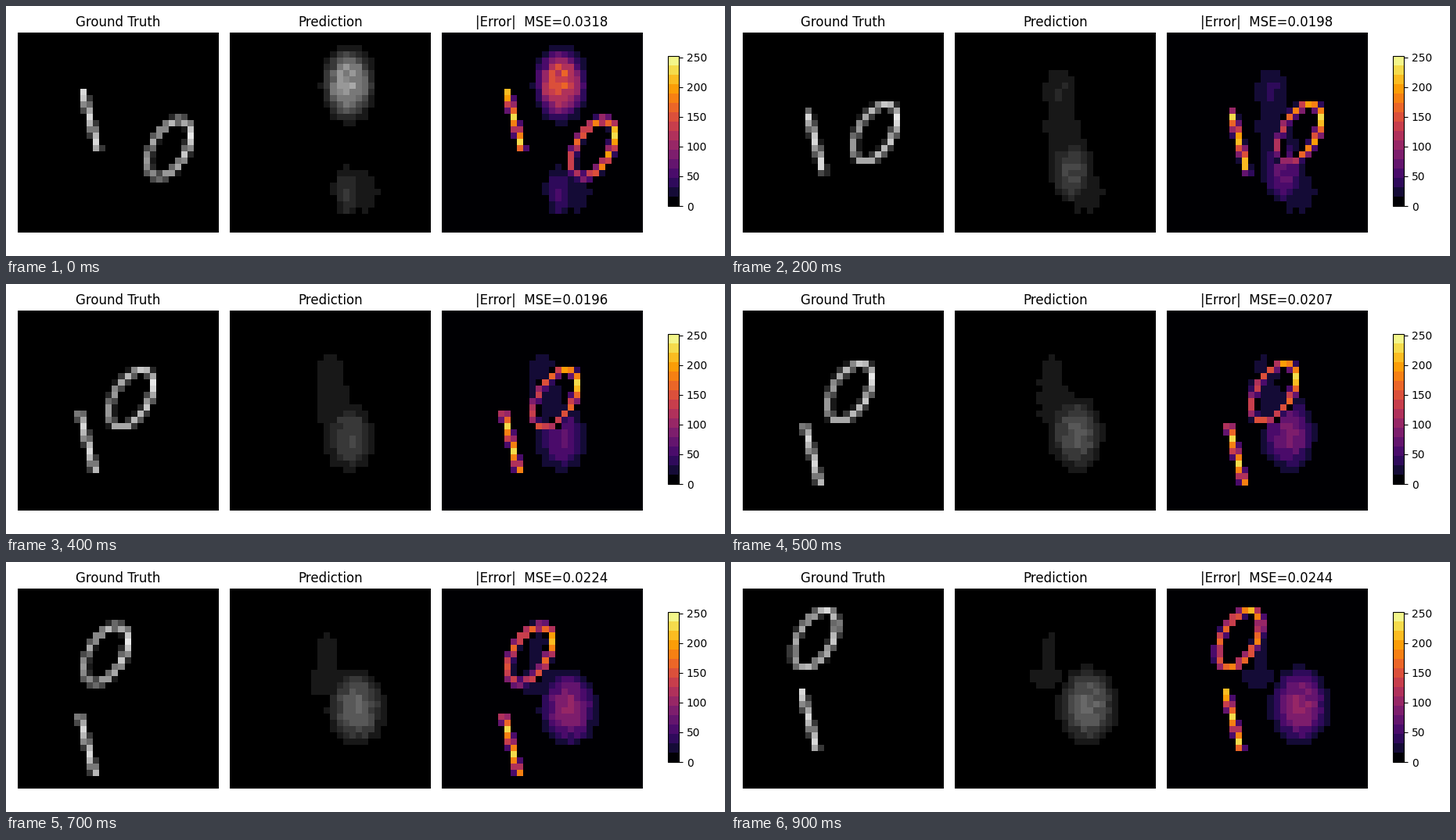
These frames come from a looping animation (919x320 px, 1000 ms). A matplotlib script:

```python
import numpy as np
import matplotlib.pyplot as plt
from matplotlib.animation import FuncAnimation
from matplotlib.colors import ListedColormap

W, H, DPI = 919, 320, 100
N, SUB, FRAMES = 32, 6, 10

# Key points over time
KEYS = [0, 1, 2, 3, 5, 7, 9]
MSE = [.0318, .0218, .0198, .0185, .0207, .0224, .0244]
BODY_PEAK = [48, 125, 65, 42, 80, 92, 95]

cells = np.arange(N) + .5
CX, CY = np.meshgrid(cells, cells)
fine = (np.arange(N * SUB) + .5) / SUB
FX, FY = np.meshgrid(fine, fine)
grain = np.random.default_rng(4).uniform(.84, 1.16, (N, N))


def stroke(xs, ys, radius=.49):
    """Coverage of each cell by a round pen following the points."""
    dist = np.full(FX.shape, 99.0)
    for x, y in zip(xs, ys):
        np.minimum(dist, (FX - x) ** 2 + (FY - y) ** 2, out=dist)
    inside = dist < radius ** 2
    return inside.reshape(N, SUB, N, SUB).mean(axis=(1, 3))


def ground_truth(t):
    # Both digits move on a half-cell raster
    x = np.floor(56.05 - 2.78 * t) / 2 - 3.95
    y = np.floor(27.55 - 2.3 * t) / 2 + 5.05
    a = np.linspace(0, 2 * np.pi, 140)
    zero = stroke(x + 3.45 * np.sin(a + .52), y - 4.55 * np.cos(a))
    zero *= 200 + 7 * (CX - x)  # heavier on the right

    # The one falls, then bounces off the lower edge
    top = np.floor(min(18.3 + 3.6 * t, 65.3 - 3.6 * t)) / 2
    left = 10.4 - (t + 1) // 5 / 2
    s = np.linspace(0, 1, 60)
    one = 235 * stroke(left + 2.4 * s, top + .4 + 9.2 * s)
    return np.clip(np.maximum(zero, one), 0, 255)


def blob(x, y, w, h, peak):
    r = np.hypot((CX - x) / w, (CY - y) / h)
    return peak * np.exp(-r ** 3)


def ease(start, end, t, span):
    """Exponential approach from start to end."""
    return end + (start - end) * np.exp(-t / span)


def prediction(t):
    head = blob(ease(18.9, 15, t, 2.5), ease(8.2, 11.5, t, 3), 3.4 - .2 * t, 4.9,
                ease(150, 27, t, .55))
    body = blob(18.5 + .033 * t ** 2, ease(25.5, 18.2, t, 3.2),
                ease(2, 4.1, t, 3), ease(4, 5.3, t, 2),
                np.interp(t, KEYS, BODY_PEAK))
    waist = blob(17.8 - .35 * t, 16 - .2 * t, 3.3, 7.3 - .6 * t, 27 * min(t, 1))
    flare = blob(20.5, 25.3, 3.9, 4, 75 * np.exp(-(t - 1) ** 2))
    return np.max([head, body, waist, flare], axis=0) * grain


def stepped(name):
    """Colormap reduced to sixteen flat steps."""
    step = np.arange(256) // 16
    index = np.where(step == 0, 0, step * 16 + 8)
    return ListedColormap(plt.get_cmap(name)(index))


fig = plt.figure(figsize=(W / DPI, H / DPI), dpi=DPI, facecolor="white")


def axes_at(x, y, w, h):
    return fig.add_axes([x / W, 1 - (y + h) / H, w / W, h / H])


def panel(column, title, cmap, vmax):
    ax = axes_at(15.1 + 270.8 * column, 34, 256.6, 256)
    image = ax.imshow(np.zeros((N, N)), cmap=stepped(cmap), vmin=0, vmax=vmax,
                      interpolation="nearest", aspect="auto")
    ax.axis("off")
    return image, ax.set_title(title, fontsize=12)


truth_image, _ = panel(0, "Ground Truth", "gray", 255)
guess_image, _ = panel(1, "Prediction", "gray", 255)
error_image, error_title = panel(2, "", "inferno", 252)
fig.colorbar(error_image, cax=axes_at(846.4, 64, 13.8, 192))


def update(t):
    truth, guess = ground_truth(t), prediction(t)
    truth_image.set_data(truth)
    guess_image.set_data(guess)
    error_image.set_data(np.abs(truth - guess))
    error_title.set_text(f"|Error|  MSE={np.interp(t, KEYS, MSE):.4f}")
    return truth_image, guess_image, error_image, error_title


anim = FuncAnimation(fig, update, frames=FRAMES, interval=100, repeat=True, repeat_delay=0)
plt.show()
```
